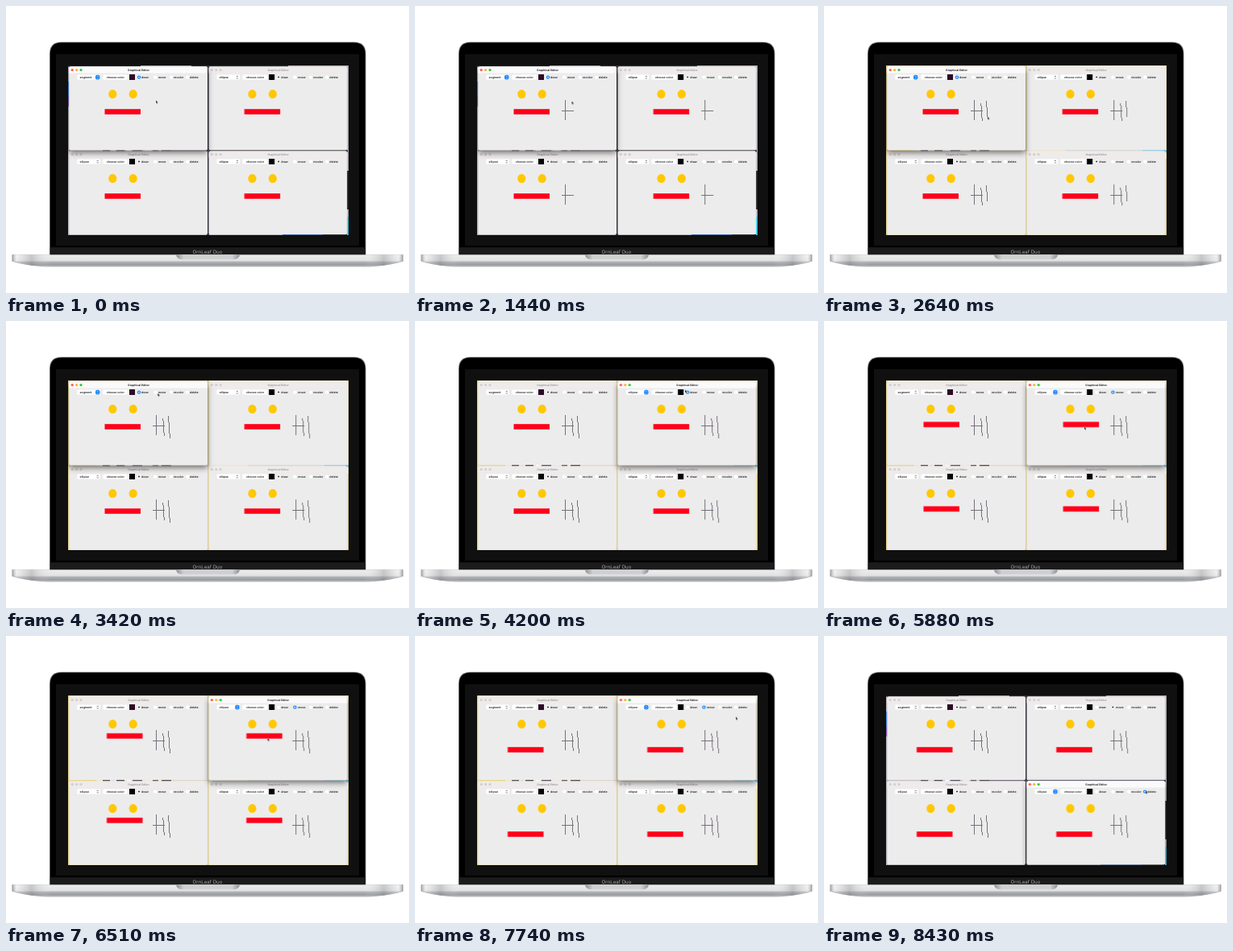
Recreate the animation shown at these times as an HTML page. Size 500 by 357 pixels, loop 8.46 s.

```html
<!DOCTYPE html>
<html lang="en">
<head>
<meta charset="utf-8">
<title>Shared drawing editor</title>
<style>
  html, body { margin: 0; width: 100%; height: 100%; overflow: hidden; background: #fff; }
  svg { display: block; width: 100vw; height: 100vh; }
  text { font-family: Inter, "Liberation Sans", sans-serif; text-rendering: geometricPrecision; }
  .label { font-size: 3.55px; font-weight: 600; fill: #222; }
  .title { font-size: 3.45px; font-weight: 700; text-anchor: middle; fill: #222; }
  .idle .title { font-weight: 600; fill: #969298; }
  .badge { font-size: 6.1px; text-anchor: middle; fill: #a2a2a4; }
  .ink { fill: none; stroke: #777179; stroke-width: 1; stroke-dasharray: 1 2; shape-rendering: crispEdges; }

  .anim, .ink, .mouth, #cursor { animation: 8460ms linear infinite; }
  .anim { animation-timing-function: step-end; }
  .mouth { animation-name: drag; }
  #cursor { animation-name: pointer; }
  .ink1 { animation-name: ink1; }
  .ink2 { animation-name: ink2; }
  .ink3 { animation-name: ink3; }
  .ink4 { animation-name: ink4; }
  .first { animation-name: first; }
  .second { animation-name: second; }
  .third { animation-name: third; }
  .preMove { animation-name: preMove; }
  .postMove { animation-name: postMove; }
  .preDelete { animation-name: preDelete; }
  .postDelete { animation-name: postDelete; }
  .cool { animation-name: cool; }
  .warm { animation-name: warm; }

  @keyframes ink1 { 0%, 1.8% { stroke-dashoffset: 1 } 7.1%, 100% { stroke-dashoffset: 0 } }
  @keyframes ink2 { 0%, 9.5% { stroke-dashoffset: 1 } 13.6%, 100% { stroke-dashoffset: 0 } }
  @keyframes ink3 { 0%, 18.4% { stroke-dashoffset: 1 } 24.2%, 100% { stroke-dashoffset: 0 } }
  @keyframes ink4 { 0%, 27.2% { stroke-dashoffset: 1 } 33.1%, 100% { stroke-dashoffset: 0 } }

  @keyframes drag {
    0%, 65% { transform: translate(0, 0) }
    77% { transform: translate(2.5px, -7.2px) }
    85.1%, 100% { transform: translate(-7.5px, 10px) }
  }
  @keyframes pointer {
    0% { transform: translate(186px, 117.5px) }
    1.8% { transform: translate(186px, 117px) }
    7.1% { transform: translate(187px, 142px) }
    9.5% { transform: translate(181.5px, 130px) }
    13.6% { transform: translate(197px, 130px) }
    17.02% { transform: translate(194.4px, 118.5px) }
    18.4% { transform: translate(194.8px, 121px) }
    24.2% { transform: translate(196.3px, 143px) }
    27.2% { transform: translate(201.5px, 118.5px) }
    33.1% { transform: translate(203.5px, 146.5px) }
    40.4% { transform: translate(187.5px, 90px) }
    46.1% { transform: translate(300px, 81px) }
    52%, 54% { transform: translate(358px, 88.5px) }
    58.5% { transform: translate(356px, 97.5px) }
    65% { transform: translate(322px, 134.2px) }
    77% { transform: translate(324.5px, 127px) }
    85.1% { transform: translate(314.5px, 144.2px) }
    91.5% { transform: translate(398px, 100.5px) }
    95.3% { transform: translate(397px, 189px) }
    97.5%, 99.99% { transform: translate(399px, 192.5px) }
    100% { transform: translate(186px, 117.5px) }
  }

  @keyframes first { 0% { opacity: 1 } 46.1%, 100% { opacity: 0 } }
  @keyframes second { 0% { opacity: 0 } 46.1% { opacity: 1 } 95.3%, 100% { opacity: 0 } }
  @keyframes third { 0% { opacity: 0 } 95.3%, 100% { opacity: 1 } }
  @keyframes preMove { 0% { opacity: 1 } 52%, 100% { opacity: 0 } }
  @keyframes postMove { 0% { opacity: 0 } 52%, 100% { opacity: 1 } }
  @keyframes preDelete { 0% { opacity: 1 } 97.5%, 100% { opacity: 0 } }
  @keyframes postDelete { 0% { opacity: 0 } 97.5%, 100% { opacity: 1 } }
  @keyframes cool { 0% { opacity: 1 } 31% { opacity: 0 } 95.3%, 100% { opacity: 1 } }
  @keyframes warm { 0% { opacity: 0 } 31% { opacity: 1 } 95.3%, 100% { opacity: 0 } }
</style>
</head>
<body>
<svg viewBox="0 0 500 357" preserveAspectRatio="none">
  <defs>
    <linearGradient id="deck" x2="0" y2="1">
      <stop offset="0" stop-color="#cbccce"/>
      <stop offset=".07" stop-color="#ececed"/>
      <stop offset=".5" stop-color="#e0e1e3"/>
      <stop offset=".58" stop-color="#b4b5b8"/>
      <stop offset=".8" stop-color="#9a9b9e"/>
      <stop offset="1" stop-color="#bdbec0"/>
    </linearGradient>
    <linearGradient id="sides">
      <stop offset="0" stop-color="#77787b" stop-opacity=".75"/>
      <stop offset=".012" stop-color="#fff" stop-opacity=".3"/>
      <stop offset=".05" stop-color="#85868a" stop-opacity=".35"/>
      <stop offset=".1" stop-color="#fff" stop-opacity="0"/>
      <stop offset=".9" stop-color="#fff" stop-opacity="0"/>
      <stop offset=".95" stop-color="#85868a" stop-opacity=".35"/>
      <stop offset=".988" stop-color="#fff" stop-opacity=".3"/>
      <stop offset="1" stop-color="#77787b" stop-opacity=".75"/>
    </linearGradient>
    <linearGradient id="notch">
      <stop offset="0" stop-color="#8e8f92"/>
      <stop offset=".12" stop-color="#cfd0d2"/>
      <stop offset=".88" stop-color="#cfd0d2"/>
      <stop offset="1" stop-color="#8e8f92"/>
    </linearGradient>
    <filter id="shadow" x="-20%" y="-20%" width="140%" height="150%">
      <feDropShadow dx="0" dy="3.5" stdDeviation="3.6" flood-opacity=".5"/>
    </filter>
    <clipPath id="screen"><rect x="77.3" y="74.8" width="346.9" height="209.4"/></clipPath>
    <path id="base" d="M7.5 309.3H492.7V317.5Q482 321.5 460 323.7Q450 324.6 435 324.6H65Q50 324.6 40 323.7Q18 321.5 7.5 317.5Z"/>
  </defs>

  <path d="M54 310V59.5Q54 44.7 68.5 44.7H432Q446.5 44.7 446.5 59.5V310Z" fill="#77787b"/>
  <path d="M54.8 310V60Q54.8 45.5 69 45.5H431.5Q445.7 45.5 445.7 60V310Z" fill="#000"/>
  <rect x="62" y="60" width="376" height="238" fill="#101010"/>
  <rect x="54.8" y="300.2" width="390.9" height="9.3" fill="#1b1b1c"/>
  <text class="badge" x="250" y="307.7">OrnLeaf Duo</text>

  <use href="#base" fill="url(#deck)"/>
  <use href="#base" fill="url(#sides)"/>
  <path d="M211 309.3H290Q289.5 315.3 281.5 315.3H219.5Q211.5 315.3 211 309.3Z" fill="url(#notch)"/>

  <g id="desktop" clip-path="url(#screen)"></g>

  <path id="cursor" d="M0 0V3.6L.9 2.8 1.5 4.2 2.1 3.9 1.5 2.6H2.7Z"
        fill="#000" stroke="#fff" stroke-width=".25"/>
</svg>
<script>
  const box = (x, y, w, h, fill, more = '') =>
    `<rect x="${x}" y="${y}" width="${w}" height="${h}" fill="${fill}" ${more}/>`;
  const disc = (x, y, r, fill) => `<circle cx="${x}" cy="${y}" r="${r}" fill="${fill}"/>`;
  const label = (x, text) => `<text class="label" x="${x}" y="89.8">${text}</text>`;

  const blue = '#1283fb';
  const radios = { draw: [165, 168], move: [185.2, 189], recolor: [205, 208], delete: [225, 228] };

  function face() {
    const eye = x => `<ellipse cx="${x}" cy="109.6" rx="5.1" ry="5.5" fill="#ffc800"/>`;
    const strokes = ['M186 117L187 142', 'M181.5 130L197 130', 'M194.8 121L196.3 143', 'M201.5 118.5L203.5 146.5'];
    return eye(132.3) + eye(157.7) +
      box(122.5, 128.2, 44.5, 6.6, '#ff0019', 'class="mouth"') +
      strokes.map((d, i) => `<path class="ink ink${i + 1}" pathLength="1" d="${d}"/>`).join('');
  }

  // marks: list of [radio name, visibility class]
  function mark([name, cls], active) {
    const x = radios[name][0];
    const dot = active ? disc(x, 88.6, 2.2, blue) + disc(x, 88.6, .9, '#fff') : disc(x, 88.6, 1, '#222');
    return `<g class="anim ${cls}">${dot}</g>`;
  }

  function popup(shape, active) {
    const color = active ? '#fff' : '#333';
    return box(88.3, 85.6, 28.6, 5.9, '#fff', 'rx="1.3"') +
      (active ? box(111, 85.8, 5.4, 5.6, blue, 'rx="2"') : '') +
      `<path d="M112.7 88L113.7 86.9 114.7 88M112.7 89.3L113.7 90.4 114.7 89.3"
        fill="none" stroke="${color}" stroke-width=".6"/>` + label(91.6, shape);
  }

  function editor({ x, y, shape, swatch, marks }, active, cls = '') {
    const lights = active ? ['#ff5a52', '#f5b62e', '#2cc63f'] : Array(3).fill('#d2ced1');
    return `<g class="anim ${active ? '' : 'idle'} ${cls}" transform="translate(${x} ${y})">` +
      box(78.4, 75.4, 171.6, 103.9, '#ececec', `rx="2" ${active ? 'filter="url(#shadow)"' : ''}`) +
      `<path d="M78.4 83.6V77.4Q78.4 75.4 80.4 75.4H248Q250 75.4 250 77.4V83.6Z" fill="${active ? '#fbfafb' : '#eeebea'}"/>` +
      lights.map((c, i) => disc(82.2 + i * 5.4, 79.6, 1.6, c)).join('') +
      '<text class="title" x="164.5" y="80.9">Graphical Editor</text>' +
      popup(shape, active) +
      box(120.3, 85.6, 30.6, 5.9, '#fff', 'rx="1.3"') + label(124.7, 'choose color') +
      box(153, 85, 7, 7, swatch) +
      Object.entries(radios).map(([name, [cx, tx]]) =>
        disc(cx, 88.6, 2.2, '#fff') + label(tx, name)).join('') +
      marks.map(m => mark(m, active)).join('') + face() + '</g>';
  }

  const dx = 173.2, dy = 105;
  const common = { shape: 'ellipse', swatch: '#000', marks: [['draw', '']] };
  const topLeft = { ...common, x: 0, y: 0, shape: 'segment', swatch: '#2c0a25' };
  const topRight = { ...common, x: dx, y: 0, marks: [['draw', 'preMove'], ['move', 'postMove']] };
  const lowLeft = { ...common, x: 0, y: dy };
  const lowRight = { ...common, x: dx, y: dy, marks: [['draw', 'preDelete'], ['delete', 'postDelete']] };

  const patches = list => list.map(p => box(...p)).join('');
  const icons = patches([
    [120, 179, 9, 3, '#222'], [131, 179, 4, 3, '#d8d4e4'], [137, 179, 10, 3, '#15151a'],
    [150, 179, 5, 3, '#fff'], [157, 179, 12, 3, '#2a2440'], [172, 179, 8, 3, '#e8e6ee'],
    [182, 179, 7, 3, '#333'], [193, 179, 12, 3, '#19191d']
  ]);
  const cool = patches([
    [77, 74, 348, 211, '#b9b5bd'], [77, 74, 90, 1.5, '#26262a'], [230, 74, 120, 1.5, '#36343c'],
    [77, 94, 2, 19, '#4d8fe8'], [77, 113, 2, 12, '#8c64b8'], [249, 74, 3, 211, '#3d3742'],
    [205, 179, 47, 3, '#50475b'], [252, 179, 172, 3, '#45404c'], [423, 205, 2, 48, '#222'],
    [423, 262, 2, 23, '#39c9e8'], [343, 284, 50, 1, '#1b4b9c'], [393, 284, 30, 1, '#161616']
  ]);
  const warm = patches([
    [77, 74, 348, 211, '#eee5c6'], [77, 74, 2, 211, '#e6d391'], [249, 74, 3, 211, '#ddcf9d'],
    [80, 179, 32, 3, '#e9cf62'], [205, 179, 47, 3, '#d8d3c0'], [300, 179, 95, 3, '#cfd3d0'],
    [395, 179, 30, 3, '#7cc4e2'], [423, 190, 2, 95, '#e8d79c']
  ]);

  document.getElementById('desktop').innerHTML =
    `<g class="anim cool">${cool}</g><g class="anim warm">${warm}</g>${icons}` +
    [topLeft, topRight, lowLeft, lowRight].map(w => editor(w, false)).join('') +
    editor(topLeft, true, 'first') + editor(topRight, true, 'second') + editor(lowRight, true, 'third');
</script>
</body>
</html>
```
